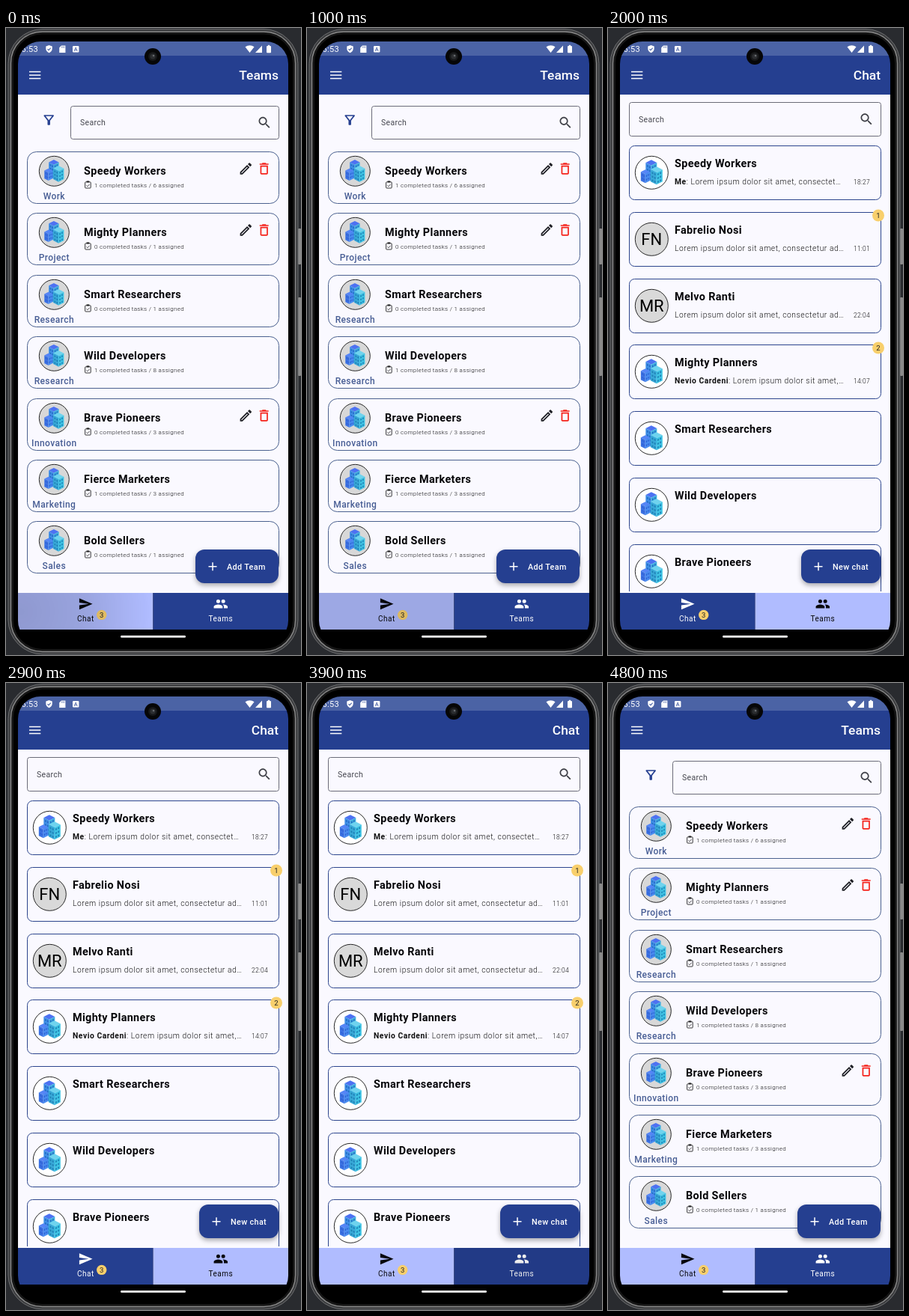
Write an HTML page that moves like this. It is 394 px wide and 838 px high and loops after 5000 ms.

```html
<!DOCTYPE html>
<html lang="en">
<head>
<meta charset="utf-8">
<title>Teams and chat</title>
<style>
html, body { margin: 0; width: 100%; height: 100%; overflow: hidden; background: #292b2f; }
svg { display: block; width: 394px; height: 838px; font-family: Roboto, "Open Sans", sans-serif; }
.title { font-size: 17.4px; font-weight: 500; fill: #fff; text-anchor: end; }
.name { font-size: 14.4px; font-weight: 700; letter-spacing: .35px; fill: #050508; }
.hint { font-size: 10.5px; letter-spacing: .3px; fill: #46474f; }
.kind { font-size: 12px; font-weight: 500; letter-spacing: .4px; fill: #475d94; text-anchor: middle; }
.count { font-size: 8px; font-weight: 300; letter-spacing: .35px; fill: #111; }
.msg { font-size: 10.3px; font-weight: 300; letter-spacing: .55px; fill: #111; }
.msg tspan { font-weight: 700; }
.time { font-size: 8.4px; font-weight: 300; letter-spacing: .35px; fill: #111; }
.initials { font-size: 22px; text-anchor: middle; }
.badge { font-size: 9.5px; text-anchor: middle; fill: #222; }
.tab { font-size: 10px; letter-spacing: .5px; text-anchor: middle; }
.fab { font-size: 10.8px; font-weight: 500; letter-spacing: .35px; fill: #fff; }
.fabbox { filter: drop-shadow(0 3px 3px rgba(0, 0, 0, .32)); }

#teams, #chat, #navTeams, #navChat { animation: 5s step-end infinite; }
#teams { animation-name: teamsPage; }
#chat { animation-name: chatPage; }
#navTeams { animation-name: teamsTab; }
#navChat { animation-name: chatTab; }
@keyframes teamsPage { 0%, 82% { opacity: 1 } 34% { opacity: 0 } }
@keyframes chatPage { 0%, 82% { opacity: 0 } 34% { opacity: 1 } }
@keyframes teamsTab { 0%, 70% { opacity: 1 } 22% { opacity: 0 } }
@keyframes chatTab { 0%, 70% { opacity: 0 } 22% { opacity: 1 } }

.wave { transform-box: fill-box; transform-origin: center; }
.wave, .press { animation: 5s linear infinite; }
#wave1 { animation-name: wave1; }
#press1 { animation-name: press1; }
#wave2 { animation-name: wave2; }
#press2 { animation-name: press2; }
@keyframes wave1 { 0% { transform: none; opacity: 1 } 6% { transform: scale(1.6); opacity: 0 } 100% { opacity: 0 } }
@keyframes press1 { 0% { opacity: 0 } 6%, 20% { opacity: .11 } 24%, 100% { opacity: 0 } }
@keyframes wave2 { 0%, 61.9% { transform: none; opacity: 0 } 62% { opacity: 1 } 68%, 100% { transform: scale(1.6); opacity: 0 } }
@keyframes press2 { 0%, 62% { opacity: 0 } 68%, 76% { opacity: .1 } 78% { opacity: .07 } 82%, 100% { opacity: 0 } }
</style>
</head>
<body>
<svg id="stage" viewBox="0 0 394 838"></svg>
<script>
const BLUE = '#253f90', PALE = '#b0bcff', PAPER = '#faf9ff', GOLD = '#f8cf6c';
const PATHS = {
  search: 'M15.5 14h-.79l-.28-.27C15.41 12.59 16 11.11 16 9.5 16 5.91 13.09 3 9.5 3S3 5.91 3 9.5 5.91 16 9.5 16c1.61 0 3.09-.59 4.23-1.57l.27.28v.79l5 4.99L20.49 19zM9.5 14C7.01 14 5 11.99 5 9.5S7.01 5 9.5 5 14 7.01 14 9.5 11.99 14 9.5 14z',
  edit: 'M14.06 9.02l.92.92L5.92 19H5v-.92l9.06-9.06M17.66 3c-.25 0-.51.1-.7.29l-1.83 1.83 3.75 3.75 1.83-1.83c.39-.39.39-1.02 0-1.41l-2.34-2.34c-.2-.2-.45-.29-.71-.29zm-3.6 3.19L3 17.25V21h3.75L17.81 9.94z',
  trash: 'M6 19c0 1.1.9 2 2 2h8c1.1 0 2-.9 2-2V7H6v12zM8 9h8v10H8V9zm7.5-5l-1-1h-5l-1 1H5v2h14V4z',
  filter: 'M7 6h10l-5.01 6.3zM4.25 5.61C6.27 8.2 10 13 10 13v6c0 .55.45 1 1 1h2c.55 0 1-.45 1-1v-6s3.72-4.8 5.74-7.39c.51-.66.04-1.61-.79-1.61H5.04c-.83 0-1.3.95-.79 1.61z',
  send: 'M2 21L23 12 2 3v7l15 2-15 2z',
  group: 'M16 11a3 3 0 1 0 0-6 3 3 0 0 0 0 6zM8 11a3 3 0 1 0 0-6 3 3 0 0 0 0 6zM8 13c-2.33 0-7 1.17-7 3.5V19h14v-2.5c0-2.33-4.67-3.5-7-3.5zM16 13c-.29 0-.62.02-.97.05 1.16.84 1.97 1.97 1.97 3.45V19h6v-2.5c0-2.33-4.67-3.5-7-3.5z'
};

const text = (cls, x, y, s, fill) => `<text class="${cls}" x="${x}" y="${y}"${fill ? ` fill="${fill}"` : ''}>${s}</text>`;
const rect = (x, y, w, h, fill, r = 0, more = '') => `<rect x="${x}" y="${y}" width="${w}" height="${h}" rx="${r}" fill="${fill}" ${more}/>`;
const path = (d, fill, more = '') => `<path d="${d}" fill="${fill}" ${more}/>`;
const circle = (x, y, r, fill, more = '') => `<circle cx="${x}" cy="${y}" r="${r}" fill="${fill}" ${more}/>`;
const line = (d, color, w) => path(d, 'none', `stroke="${color}" stroke-width="${w}"`);
const icon = (name, cx, cy, fill, s = .855) =>
  path(PATHS[name], fill, `fill-rule="evenodd" transform="translate(${cx - 12 * s} ${cy - 12 * s}) scale(${s})"`);
const outline = (x, y, w, h, r, color) => rect(x + .5, y + .5, w - 1, h - 1, 'none', r, `stroke="${color}"`);

// Isometric block: top corner at (x, y), half width w, height h
function block(x, y, w, h, top, left, right, glass) {
  const d = w / 2;
  let s = path(`M${x} ${y}l${w} ${d} ${-w} ${d} ${-w} ${-d}z`, top)
    + path(`M${x - w} ${y + d}l${w} ${d}v${h}l${-w} ${-d}z`, left)
    + path(`M${x + w} ${y + d}l${-w} ${d}v${h}l${w} ${-d}z`, right);
  for (let v = 2; v < h - 3; v += 5)
    for (const u of [.22, .62]) {
      const a = w * .22;
      s += path(`M${x - w + u * w} ${y + d + u * d + v}l${a} ${a / 2}v2.4l${-a} ${-a / 2}z`, glass)
        + path(`M${x + w - u * w} ${y + d + u * d + v}l${-a} ${a / 2}v2.4l${a} ${-a / 2}z`, glass);
    }
  return s;
}

function avatar(x, y, r, fill, s) {
  return circle(x, y, r, fill, 'stroke="#111" stroke-width=".9"') + `<g transform="translate(${x} ${y}) scale(${s})">`
    + block(-.5, -17, 7.5, 21, '#4d72f2', '#3f8fe6', '#3fb0de', '#2367c2')
    + block(-8.5, -4, 6, 12, '#5585f6', '#3d73e4', '#4a8df0', '#2d5fd2')
    + block(6.5, -8, 8, 16, '#6fd3ee', '#39a9d8', '#3fc4e4', '#1d7fb4') + '</g>';
}

const badge = (x, y, r, s) => circle(x, y, r, GOLD) + text('badge', x, y + 3.4, s);

function fab(x, label) {
  return rect(x, 697, 364 - x, 45, BLUE, 12, 'class="fabbox"')
    + line(`M${x + 17.5} 719.7h11M${x + 23} 714.2v11`, '#fff', 1.5) + text('fab', x + 42, 723.6, label);
}

function searchBox(x, y, h) {
  return outline(x, y, 365 - x, h, 3, '#6b6c78') + text('hint', x + 13, y + h / 2 + 3.7, 'Search')
    + icon('search', 345.2, y + h / 2, '#3f4047');
}

function teamCard([name, kind, done, all, own], i) {
  const y = 165 + Math.round(i * 82.4);
  return outline(28, y, 337, 70, 12, '#4b618f') + avatar(64.3, y + 26.3, 20, '#d8d8d8', .9)
    + text('kind', 64.3, y + 64, kind) + text('name', 104, y + 30.5, name)
    + rect(105.6, y + 40.8, 7.6, 8.2, 'none', 1, 'stroke="#222" stroke-width=".9"')
    + rect(107.6, y + 39.4, 3.6, 2, '#222')
    + line(`M107.4 ${y + 45.3}l1.5 1.5 2.7-3`, '#222', .8)
    + text('count', 118, y + 47.7, `${done} completed tasks / ${all} assigned`)
    + (own ? icon('edit', 320.3, y + 23, '#1d1e24') + icon('trash', 344.7, y + 23, '#f5231b') : '');
}

function chatCard([name, from, words, time, unread, initials], i) {
  const y = 157 + Math.round(i * 88.8);
  return outline(28, y, 337, 73, 7, '#2c458d')
    + (initials
      ? circle(58.3, y + 36.3, 22, '#d9d9d9', 'stroke="#111" stroke-width=".9"') + text('initials', 58.3, y + 44, initials)
      : avatar(58.3, y + 36.3, 22, '#fff', 1))
    + text('name', 89, y + 28.7, name)
    + (words ? text('msg', 89, y + 52.2, (from ? `<tspan>${from}</tspan>: ` : '') + words) + text('time', 328, y + 51.8, time) : '')
    + (unread ? badge(361, y + 4.5, 8, unread) : '');
}

const teams = [
  ['Speedy Workers', 'Work', 1, 6, 1], ['Mighty Planners', 'Project', 0, 1, 1],
  ['Smart Researchers', 'Research', 0, 1], ['Wild Developers', 'Research', 1, 8],
  ['Brave Pioneers', 'Innovation', 0, 3, 1], ['Fierce Marketers', 'Marketing', 1, 3],
  ['Bold Sellers', 'Sales', 0, 1]
];
const lorem = 'Lorem ipsum dolor sit amet,';
const chats = [
  ['Speedy Workers', 'Me', lorem + ' consectet…', '18:27'],
  ['Fabrelio Nosi', '', lorem + ' consectetur ad…', '11:01', 1, 'FN'],
  ['Melvo Ranti', '', lorem + ' consectetur ad…', '22:04', 0, 'MR'],
  ['Mighty Planners', 'Nevio Cardeni', lorem + '…', '14:07', 2],
  ['Smart Researchers'], ['Wild Developers'], ['Brave Pioneers']
];

const page = (id, title, body) => `<g id="${id}">${rect(16, 37, 361, 52, BLUE)}${rect(16, 89, 361, 666, PAPER)}`
  + line('M31 58.5h15.3M31 63h15.3M31 67.5h15.3', '#fff', 1.7) + text('title', 364, 69, title)
  + `<g clip-path="url(#list)">${body}</g></g>`;

function tab(x, cx, name, label, on) {
  const ink = on ? '#fff' : '#08080c';
  return rect(x, 755, 180.5, 49, on ? BLUE : PALE) + icon(name, cx, 769.7, ink, .84) + text('tab', cx, 792.8, label, ink);
}
const nav = (id, chatOn) => `<g id="${id}">${tab(16, 106.3, 'send', 'Chat', chatOn)}${tab(196.5, 286.8, 'group', 'Teams', !chatOn)}</g>`;
const ripple = (n, x, cx) => `<g clip-path="url(#tab${n})">${circle(cx, 780, 175, 'url(#soft)', `id="wave${n}" class="wave"`)}`
  + rect(x, 755, 180.5, 49, '#000', 0, `id="press${n}" class="press"`) + '</g>';

const clip = (id, shape) => `<clipPath id="${id}">${shape}</clipPath>`;
const defs = '<defs>' + clip('screen', rect(16, 18, 361, 804, '#000', 30)) + clip('list', rect(16, 89, 361, 664, '#000'))
  + clip('tab1', rect(16, 755, 180.5, 49, '#000')) + clip('tab2', rect(196.5, 755, 180.5, 49, '#000'))
  + '<radialGradient id="soft"><stop offset="0" stop-opacity=".19"/><stop offset=".5" stop-opacity=".13"/><stop offset="1" stop-opacity="0"/></radialGradient></defs>';

const phone = rect(390, 268, 4, 48, '#8b8b8b', 1) + rect(390, 360, 4, 105, '#8b8b8b', 1)
  + rect(3, 1.5, 387, 835.5, '#3b3c3e', 46, 'stroke="#6d6e70"')
  + rect(6.5, 5, 380, 828.5, '#161616', 42, 'stroke="#8a8a8a" stroke-width="1.4"')
  + rect(10, 8.5, 373, 821.5, '#000', 38);

const status = rect(16, 18, 361, 19, '#4b63a5')
  + '<text x="20.5" y="32" font-size="11" letter-spacing=".3" fill="#fff">6:53</text>'
  + path('M57.5 23l4.2 1.6v3.2c0 2.6-1.8 4.4-4.2 5.4-2.4-1-4.2-2.8-4.2-5.4v-3.2z', '#fff')
  + line('M55.4 28.1l1.6 1.6 2.7-3', '#4b63a5', 1.1)
  + path('M74 23.5h5.4v9.6h-8.2v-6.8z', '#fff') + line('M74.6 24.6v2M76.2 24.6v2M77.8 24.6v2', '#4b63a5', .7)
  + rect(89, 24, 8.4, 8.4, '#fff', 1.2) + line('M91.2 30.9l2-5 2 5M91.9 29.3h2.6', '#4b63a5', .9)
  + path('M319.5 25.3c3.6-2.9 8.6-2.9 12 0l-6 7.6z', '#fff') + path('M333 33h9v-9.5z', '#fff')
  + rect(348, 24, 6, 9.2, '#fff', 1) + rect(349.8, 22.8, 2.4, 2, '#fff');

const camera = circle(196, 38, 11, '#060607') + circle(196, 38, 6, '#17181a') + circle(196, 38, 3.6, '#2c2e31')
  + circle(197, 37, 1.3, '#65686c');

document.getElementById('stage').innerHTML = defs + phone + '<g clip-path="url(#screen)">'
  + page('teams', 'Teams', icon('filter', 57.2, 123, BLUE) + searchBox(86, 104, 45) + teams.map(teamCard).join('') + fab(253, 'Add Team'))
  + page('chat', 'Chat', searchBox(28, 99, 46) + chats.map(chatCard).join('') + fab(258, 'New chat'))
  + status + nav('navTeams', false) + nav('navChat', true) + badge(127.7, 784.4, 6.7, 3)
  + ripple(1, 16, 20) + ripple(2, 196.5, 287) + '</g>'
  + rect(153, 812, 87, 2.8, '#fff', 1.4) + camera;
</script>
</body>
</html>
```
